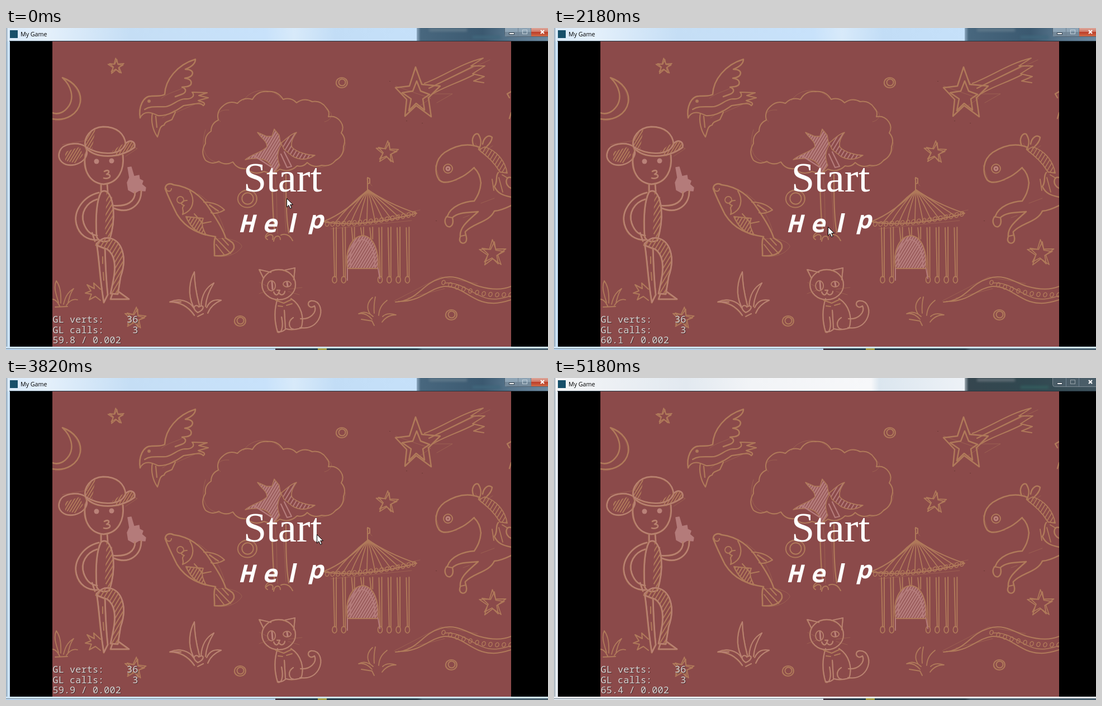
An HTML page with a canvas for the animation above (5280 ms loop, 970 px wide and 577 px high).

```html
<!DOCTYPE html>
<html lang="en">
<head>
<meta charset="utf-8">
<title>My Game</title>
<style>
html, body { margin: 0; width: 100%; height: 100%; overflow: hidden; background: #000; }
canvas { display: block; }
</style>
</head>
<body>
<canvas id="stage" width="970" height="577"></canvas>
<script>
const W = 970, H = 577, LOOP = 5280;
const ctx = document.getElementById('stage').getContext('2d');
const ORANGE = '#b07a5a', PINK = '#ba8279', HATCH = '#b47b7a';

// [time, x, y] of the pointer; each position holds until the next
const POINTER = [
  [0, 502, 305], [160, 502, 326], [300, 500, 340], [430, 497, 346], [570, 495, 349],
  [700, 492, 349], [840, 492, 340], [970, 490, 326], [1110, 489, 300], [1240, 490, 275],
  [1360, 490, 272], [1790, 492, 300], [1900, 494, 326], [2050, 492, 345], [2180, 490, 356],
  [3430, 505, 320], [3550, 530, 288], [3700, 548, 265], [3820, 556, 280], [4120, 560, 283],
  [4250, 567, 286], [4390, 620, 330], [4520, 760, 430], [4640, 925, 545], [4790, 933, 552],
  [4910, 934, 566], [5060, -50, -50]
];
const STATS = [
  [0, '59.8 / 0.002'], [160, '59.6 / 0.002'], [570, '59.7 / 0.001'], [840, '60.1 / 0.001'],
  [970, '59.9 / 0.001'], [1240, '60.1 / 0.002'], [1790, '59.9 / 0.001'], [2050, '60.1 / 0.002'],
  [2330, '59.8 / 0.002'], [2610, '60.2 / 0.002'], [2890, '61.1 / 0.001'], [3160, '60.1 / 0.002'],
  [3310, '59.5 / 0.002'], [3700, '59.9 / 0.002'], [4120, '60.1 / 0.002'], [4390, '59.7 / 0.002'],
  [4790, '60.0 / 0.002'], [5060, '59.8 / 0.002'], [5180, '65.4 / 0.002']
];

const held = (keys, t) => keys.filter(k => k[0] <= t).pop();
const within = (t, a, b) => t >= a && t < b;

function box(c, x, y, w, h, fill) {
  c.fillStyle = fill;
  c.fillRect(x, y, w, h);
}

function blend(c, x0, y0, x1, y1, ...stops) {
  const g = c.createLinearGradient(x0, y0, x1, y1);
  stops.forEach(([p, col]) => g.addColorStop(p, col));
  return g;
}

function paintArt() {
  const cv = document.createElement('canvas');
  cv.width = W;
  cv.height = H;
  const c = cv.getContext('2d');
  c.lineCap = c.lineJoin = 'round';
  box(c, 83, 24, 821, 547, '#8b4a4a');
  c.beginPath();
  c.rect(83, 24, 821, 547);
  c.clip();

  const line = (d, col = ORANGE, w = 2.5) => {
    c.strokeStyle = col;
    c.lineWidth = w;
    c.stroke(d instanceof Path2D ? d : new Path2D(d));
  };
  // crayon line: orange edge with a pinker core
  const crayon = (d, w = 3) => {
    line(d, ORANGE, w);
    c.save();
    c.translate(.4, -.3);
    line(d, PINK, w * .55);
    c.restore();
  };
  const faint = d => {
    c.globalAlpha = .45;
    line(d, ORANGE, 1);
    c.globalAlpha = 1;
  };
  const hatch = (d, x, y, w, h, gap = 4, col = HATCH, lw = 2) => {
    c.save();
    c.clip(new Path2D(d));
    c.beginPath();
    for (let i = x - h; i < x + w + h; i += gap) {
      c.moveTo(i, y + h);
      c.lineTo(i + h * .6, y);
    }
    c.strokeStyle = col;
    c.lineWidth = lw;
    c.stroke();
    c.restore();
  };
  const oval = (x, y, rx, ry = rx, rot = 0) => {
    const p = new Path2D();
    p.ellipse(x, y, rx, ry, rot, 0, 7);
    return p;
  };
  const bumps = (pts, k) => {
    const p = new Path2D();
    p.moveTo(...pts[0]);
    pts.slice(1).forEach(([x, y], i) => {
      const [a, b] = pts[i];
      p.quadraticCurveTo((a + x) / 2 + (y - b) * k, (b + y) / 2 - (x - a) * k, x, y);
    });
    return p;
  };
  const star = (x, y, r, rot) => {
    for (const [s, turn] of [[1, 0], [.85, .16]]) {
      const p = new Path2D();
      for (let i = 0; i < 10; i++) {
        const a = rot + turn + i * Math.PI / 5, q = s * r * (i % 2 ? .38 : 1);
        p.lineTo(x + q * Math.sin(a), y - q * Math.cos(a));
      }
      p.closePath();
      line(p, ORANGE, 1.7);
    }
  };
  const ring = (x, y, r) => {
    line(oval(x, y, r, r * .92), ORANGE, 1.8);
    line(oval(x + .5, y - .5, r * .6), ORANGE, 2);
    faint(oval(x - 1, y + 1, r, r * .85));
  };

  // sky
  line('M101 89C122 96 136 114 133 133C129 154 108 167 83 163M101 89C117 104 122 124 113 139C105 151 94 156 83 152');
  faint('M106 92C130 104 139 130 126 150C116 162 100 166 88 166');
  star(197, 69, 15, -.05);
  star(682, 223, 21, .06);
  star(871, 404, 25, -.02);
  star(231, 520, 20, .12);
  ring(601, 98, 10);
  ring(419, 525, 10);
  ring(797, 514, 10);
  ring(432, 306, 17);
  line('M904 114L897 118L901 125M904 152L901 162');
  line('M733 70L744 101L777 104L756 125L761 159L734 139L714 158L717 128L697 107L722 104Z');
  line('M735 95L742 113L758 119L746 127L749 147L734 135L721 148L725 127L709 116L728 113Z');
  line('M749 99C780 88 815 63 854 54L832 68L857 68L835 82L856 87L837 95L855 98M757 108L836 69M764 118C785 105 810 98 837 84', ORANGE, 2);
  faint('M733 74L747 103M766 118L799 118L771 134M763 105L866 57M697 104L760 126L740 140');

  // bird
  line('M240 161C237 142 245 122 260 122C271 121 277 123 284 119C285 93 306 66 339 56C339 65 331 70 321 74C331 74 336 78 333 84C330 89 325 89 320 90C329 91 333 95 331 101C328 106 321 105 315 106C324 109 323 116 314 119L303 123');
  line('M240 161C247 147 260 151 272 157C290 158 305 148 318 139C337 137 347 132 353 139C360 134 349 132 344 130L362 125L345 121L360 116L333 115C340 122 331 128 320 127C308 127 299 139 286 141C270 142 259 139 248 146', ORANGE, 2.2);
  line('M262 153C259 167 263 184 271 195C275 184 275 175 283 174C285 167 290 168 297 164L303 151M268 158L270 178', ORANGE, 2.2);
  line(oval(256, 131, 1.6));
  faint('M315 108C305 114 292 115 278 126M305 151L351 131M280 161L302 147');

  // tree
  const crown = bumps([[381, 239], [357, 237], [357, 207], [367, 185], [380, 165], [388, 140], [414, 135],
    [441, 128], [468, 114], [496, 128], [520, 134], [548, 132], [573, 143], [577, 159], [599, 168],
    [600, 188], [604, 212], [590, 237], [565, 246], [539, 241], [521, 247], [490, 253], [462, 257],
    [430, 252], [406, 240], [381, 239]], .32);
  line(crown, ORANGE, 2);
  faint('M357 182C343 230 367 246 402 242M384 168C374 158 379 145 399 147M425 130C440 105 480 108 492 126M573 146C589 152 582 166 570 168M607 205C610 228 586 247 560 250');
  const leftBough = 'M450 187C458 199 468 204 467 213C456 224 443 224 428 236C448 232 464 232 474 246L478 262L490 246C484 232 486 222 492 210L489 192L480 181L476 194L466 194Z';
  const rightBough = 'M492 206C500 201 507 191 520 187C512 198 509 206 512 214C522 223 540 228 553 228C538 238 524 236 513 230L498 218Z';
  hatch(leftBough, 425, 180, 70, 84, 5, HATCH, 3.2);
  hatch(rightBough, 490, 186, 64, 50, 7, HATCH, 2);
  line(leftBough, ORANGE, 1.4);
  line(rightBough, ORANGE, 1.6);
  line('M498 222L511 248L503 250L492 226', HATCH, 2.2);
  line('M444 229L478 251', HATCH, 2.5);
  line('M474 262C478 290 476 330 481 365M501 262C501 300 501 338 506 367', ORANGE, 2.2);
  faint('M482 268C486 310 484 340 486 368M496 268L501 365');
  line('M466 374C472 368 480 369 477 379M479 382C480 371 491 370 491 379M492 371C503 367 509 373 513 381M471 366C464 370 462 376 468 379', ORANGE, 2);

  // boy
  const brim = 'M143 213C128 203 101 207 96 221C90 237 104 249 123 245C135 242 144 234 145 224Z';
  const cap = 'M142 213C138 197 151 178 174 177C199 177 212 190 214 208C206 229 168 229 142 213Z';
  hatch('M106 222L132 213L138 228L124 242L106 238Z', 105, 210, 36, 33, 5, ORANGE, 2);
  hatch('M142 213C140 198 148 186 160 181L154 218Z', 142, 180, 20, 40, 5, ORANGE, 2);
  hatch('M190 221C201 212 212 205 226 202L230 214L201 230Z', 188, 202, 42, 28, 5, ORANGE, 2);
  crayon(brim, 2.6);
  crayon(cap, 2.8);
  crayon('M143 215C161 235 203 234 230 214C232 203 222 199 214 207M144 222C135 248 146 277 174 280C202 278 212 253 209 228');
  faint('M101 209L117 206L148 201M222 211L235 216L214 230M140 225L145 260');
  c.fillStyle = PINK;
  c.fill(oval(162, 239, 4.5));
  c.fill(oval(189, 238, 4.5));
  crayon('M176 257C184 252 187 259 180 262C190 262 187 272 175 269', 2.8);
  const hand = 'M218 250L224 249L229 266L238 264L239 271L245 274L243 280L250 286L249 292L238 291L230 296L219 290L217 277L221 268Z';
  c.fillStyle = HATCH;
  c.fill(new Path2D(hand));
  line(hand, HATCH, 1.5);
  crayon('M231 294C231 310 218 321 190 318M242 292C242 316 222 335 193 323M170 281L170 293M181 281L182 293');
  const torso = 'M170 294C181 286 190 302 192 326C194 351 188 371 185 381C174 385 163 381 162 373C160 339 162 310 170 294Z';
  hatch('M180 292L190 303L192 351L185 379L177 367Z', 165, 290, 30, 92, 7, ORANGE, 2);
  crayon(torso);
  crayon('M166 295C137 302 120 329 126 352C131 371 145 380 163 380M163 307C143 313 133 332 139 350C145 367 154 371 163 372M154 367L159 382');
  const leg = 'M161 389C173 369 197 374 206 394C213 410 211 429 205 446L200 477L187 476C192 452 197 433 193 416C190 402 181 395 176 395Z';
  hatch(leg, 161, 378, 50, 98, 7, ORANGE, 2);
  crayon(leg);
  crayon('M162 386C167 416 168 452 175 492M177 395C178 427 179 451 182 478L175 492M190 477L187 486L220 486L202 473');
  line('M169 468L157 457L158 467L145 460L152 471L142 475L153 477L149 487L160 481L169 488', ORANGE, 2);
  line('M173 410V422M174 438L175 452', ORANGE, 2);

  // fish
  const fish = 'M285 288C285 280 293 277 300 281C331 285 352 304 365 325C380 347 390 365 393 376C401 383 409 383 408 394C403 408 386 409 373 408C374 396 370 383 375 374C348 370 323 361 306 334C297 316 290 302 285 288Z';
  line(fish, ORANGE, 2.6);
  line('M329 292C338 307 337 326 316 334C320 326 312 324 319 318C309 315 316 309 324 309M354 312C365 312 380 315 391 326C384 330 375 334 367 331M364 317L380 328', ORANGE, 2.2);
  const fin = 'M322 338L353 341C348 352 354 363 358 371C344 368 331 359 322 338Z';
  hatch(fin, 322, 337, 35, 34, 6, ORANGE, 2);
  line(fin, ORANGE, 2);
  line(oval(312, 308, 6), ORANGE, 1.8);
  line('M287 288A4 4 0 1 0 296 288M374 375L402 404M376 388L391 407M387 377L398 389M337 333L352 350L367 347', ORANGE, 2);
  faint('M375 379C396 373 423 384 422 392C413 407 391 412 374 408M344 297C369 313 383 336 391 363');

  // plants
  line('M96 498C92 490 88 486 83 486M98 493C99 475 97 462 90 453M90 453C84 466 91 480 94 492M103 495C107 478 113 472 121 467C114 476 113 486 111 492M108 497C114 488 121 485 128 487M88 500L110 499', ORANGE, 1.8);
  crayon('M337 515C326 499 312 491 293 491C311 483 329 490 336 502M335 499C324 476 329 452 337 437C337 460 341 478 346 497M349 498C350 478 359 464 372 457C362 473 358 486 357 499M359 501C365 488 374 486 385 488C373 493 365 501 361 511M343 510C329 501 341 493 345 500C354 494 357 504 343 510M343 517L353 512M294 491L313 491', 2.3);
  line('M655 522C648 514 640 510 631 512C642 506 652 512 657 517M652 513C644 502 647 491 656 483M659 511C658 500 659 491 661 482M667 515C668 502 673 495 682 488M674 517C679 512 688 511 698 514C685 514 678 520 673 527M636 522L655 525L659 533', ORANGE, 1.8);

  // cat
  crayon(oval(488, 460, 30, 27), 2.3);
  crayon('M461 449L453 433L474 438M499 434L517 430L515 451M485 470L490 470L488 474C485 482 480 477 479 473M488 474C492 481 498 478 499 472M486 485C479 506 480 525 486 545C493 548 497 536 493 518M510 485C529 497 534 520 528 538C517 541 507 541 500 539L498 506M501 539C495 545 490 545 486 544M514 519C503 526 506 539 515 540M527 521C545 523 557 509 552 498C542 506 536 491 546 489C562 488 568 507 559 523C551 536 538 539 526 537', 2.3);
  crayon(oval(475, 462, 7, 9), 1.8);
  crayon(oval(503, 459, 7, 5), 1.8);
  line('M476 455L477 468M503 456L504 462', PINK, 3);
  line('M483 488L497 493L512 486M487 498L495 499M502 497L512 494', ORANGE, 2);
  faint('M454 456L470 464M453 476L470 470M505 468L530 465M505 472L525 478');

  // tent
  line('M648 290C625 314 600 334 568 347C617 357 688 345 735 332C708 323 677 310 648 290M647 290V268L651 270V278L647 279', ORANGE, 2);
  for (let i = 0; i < 10; i++) {
    const x = 588 + i * 14.5, y = 350 - i * i * .16;
    line(`M648 290Q${(648 + x) / 2 + (i - 4.5)} 317 ${x} ${y}`, ORANGE, 1.7);
  }
  for (let i = 0; i < 17; i++) line(oval(575 + i * 9.7, 351 - i * i * .07, 3.2, 4.5, .4), ORANGE, 1.4);
  for (let i = 0; i < 9; i++) {
    const x = 586 + i * 16.3, inDoor = x > 612 && x < 664;
    const end = inDoor ? 370 + Math.abs(x - 638) * .6 : 446;
    line(`M${x} 358L${x + 2} ${end}M${x + 5} 357L${x + 5} ${end}`, ORANGE, 1.9);
    if (!inDoor) line(oval(x + 2, 451, 4, 6), ORANGE, 1.7);
  }
  const door = 'M611 431C606 400 618 374 638 372C658 373 668 399 666 431Z';
  hatch(door, 610, 371, 58, 61, 5, HATCH, 3.2);
  line(door, ORANGE, 2);
  line('M611 431V452M666 431L669 449M617 427C613 397 624 381 638 379C651 381 661 397 660 428', HATCH, 2);
  faint('M568 347L640 349L741 326M581 360L726 345M645 270L655 283');

  // horse
  line('M848 214C824 204 802 212 785 223C766 237 767 260 775 272C784 281 799 275 811 269C825 263 832 255 838 250M837 211C831 198 839 187 845 190C851 199 851 209 846 217M853 208C855 196 864 190 870 196C869 206 861 211 857 216');
  line(oval(791, 252, 8), ORANGE, 2);
  line(oval(791, 252, 3), PINK, 3);
  const mane = 'M857 213C878 220 893 237 897 260L884 258C872 238 858 228 846 218Z';
  hatch(mane, 850, 213, 48, 47, 7, ORANGE, 1.6);
  line(mane, ORANGE, 1.8);
  line('M838 251C846 258 849 268 850 278M850 277C849 292 844 301 838 310C820 311 796 319 790 337C782 343 786 358 795 356C802 352 800 344 799 340C809 329 831 331 845 329C830 343 811 356 813 374C809 384 818 389 823 383C827 376 821 369 822 365C837 349 865 348 874 328C886 327 896 322 904 318M881 259C875 266 881 275 874 284C880 297 890 300 904 303M904 268C894 264 891 282 904 287');
  line('M788 338L799 340M814 373L823 371M870 271L873 291M882 268L889 294M888 263L898 269', ORANGE, 1.8);
  faint('M840 207L851 224L871 211M768 246L778 276L807 273M850 314L874 305M818 340L829 336');

  // path
  line('M697 491C738 488 743 459 777 449C804 439 827 457 847 463C872 470 890 469 904 463M702 490C742 491 756 467 784 463C817 461 833 492 869 493C882 494 895 490 904 487', ORANGE, 2);
  line('M785 457C817 454 836 480 864 485C880 488 894 482 904 480', ORANGE, 1.6);
  for (let i = 0; i < 11; i++) line(oval(783 + i * 12, 456 + 22 * Math.sin(Math.min(i, 8) * .19), 3, 4, .4), ORANGE, 1.4);
  faint('M695 489L778 446L844 458M719 484L785 467');
  [[686, 95], [716, 166], [769, 345], [744, 170]].forEach(([x, y]) => box(c, x, y, 2, 1, '#6c3936'));
  return cv;
}

function paintChrome(c, active) {
  const pale = active ? '#c9e2fb' : '#e9edf3';
  box(c, 0, 0, W, H, pale);
  box(c, 0, 0, 737, 24, active
    ? blend(c, 0, 0, 737, 0, [0, '#d9eafb'], [.1, '#e4f0fb'], [.3, '#c5def5'], [.63, '#c8e2fb'], [.7, '#d8eafa'], [.8, '#c2ddf6'], [1, '#c6e1fa'])
    : blend(c, 0, 0, 737, 0, [0, '#f4f5f7'], [.32, '#e2e9f0'], [.48, '#f2f4f7'], [.77, '#f7f8fa'], [.79, '#dbe6ef'], [1, '#eef2f7']));
  box(c, 735, 0, 235, 24, active
    ? blend(c, 735, 0, 970, 0, [0, '#8ea9c1'], [.03, '#48677e'], [.5, '#3b5970'], [.72, '#58768d'], [1, '#6d899f'])
    : blend(c, 735, 0, 970, 0, [0, '#a3adb5'], [.03, '#35464f'], [.5, '#304850'], [1, '#3d515b']));
  c.save();
  c.filter = 'blur(2px)';
  box(c, 757, 1, 68, 5, active ? '#60798b' : '#637078');
  box(c, 835, 14, 50, 5, active ? '#40677c' : '#345d5e');
  c.restore();
  box(c, 6, 23, W, 1, '#24343f');
  box(c, 1, 0, 1, H, '#6d7d8a');
  box(c, 2, 24, 4, H, active ? '#cae2f7' : '#e7edf4');

  // window buttons
  c.beginPath();
  c.roundRect(892.5, -4, 84, 19.5, 4);
  c.fillStyle = active ? '#8ea4b5' : '#4a5d68';
  c.fill();
  c.strokeStyle = active ? '#4d6171' : '#7d8a93';
  c.lineWidth = 1;
  c.stroke();
  if (active) {
    box(c, 893, 7, 46, 8, '#74899a');
    box(c, 940, 0, 30, 15, blend(c, 0, 0, 0, 15, [0, '#dda69a'], [.45, '#cf7664'], [.5, '#bd3c27'], [1, '#cf6b48']));
  }
  box(c, 916, 0, 1, 15, '#6e8292');
  box(c, 939, 0, 1, 15, '#6e8292');
  box(c, 900, 8, 10, 4, '#34434f');
  box(c, 901, 9, 8, 2, '#fff');
  c.strokeStyle = active ? '#c3d0da' : '#97a2a9';
  c.strokeRect(924.5, 3.5, 8, 7);
  c.lineWidth = 2.2;
  c.strokeStyle = '#fff';
  c.stroke(new Path2D('M957 4L963 10M963 4L957 10'));

  box(c, 7, 4, 14, 14, '#17506a');
  c.font = '10.7px "Open Sans", sans-serif';
  c.textAlign = 'left';
  c.fillStyle = '#000';
  c.fillText('My Game', 26, 15);

  box(c, 7, 24, 963, 547, '#000');

  // lower border with the desktop showing through
  box(c, 0, 571, W, 3, active ? '#cfe5f8' : '#e9edf2');
  box(c, 0, 574, W, 1, '#74848f');
  box(c, 0, 575, 482, 2, active ? '#bcd8f1' : '#e2e9ef');
  box(c, 482, 574, 488, 3, blend(c, 482, 0, 970, 0, [0, '#433945'], [.12, '#233e4b'], [.52, '#2b414d'], [.54, '#4a6170'], [1, '#4a6170']));
  box(c, 558, 574, 16, 3, '#a3a14d');
}

function scaled(c, x, y, k, paint) {
  c.save();
  c.translate(x, y);
  c.scale(k, k);
  paint();
  c.restore();
}

function paintMenu(c, t) {
  const startOn = within(t, 1240, 1790) || within(t, 3970, 4390);
  const helpOn = within(t, 2330, 3310);
  c.fillStyle = '#fff';
  c.textAlign = 'center';
  scaled(c, 495, 267, startOn ? 1.2 : 1, () => {
    c.font = '74.5px "Liberation Serif", serif';
    c.fillText('Start', 0, 25.5);
  });
  scaled(c, 493, 351, helpOn ? 1.2 : 1, () => {
    [...'Help'].forEach((ch, i) => {
      const face = ch === 'l' ? '"Noto Sans"' : '"Noto Sans Mono"';
      const lift = ch === 'p' ? 7 : 0;
      c.font = `italic bold 44px ${face}, sans-serif`;
      c.fillText(ch, -63 + i * 41.5, 15 - lift);
    });
  });
}

function paintStats(c, t) {
  const rows = ['GL verts:    36', 'GL calls:     3', held(STATS, t)[1]];
  c.font = '17px "Noto Sans Mono", monospace';
  c.textAlign = 'left';
  rows.forEach((row, i) => {
    const y = 527.6 + i * 18.9;
    c.fillStyle = '#4b3030';
    c.fillText(row, 84.5, y + 1);
    c.fillStyle = '#d9d3d2';
    c.fillText(row, 83.5, y);
  });
}

const arrow = new Path2D('M.5 .5V16L4 12.6L6.6 18.5L9.2 17.4L6.7 11.6H11.5Z');
function paintPointer(c, t) {
  const [, x, y] = held(POINTER, t);
  c.save();
  c.translate(x, y);
  c.fillStyle = '#fff';
  c.fill(arrow);
  c.strokeStyle = '#000';
  c.lineWidth = 1;
  c.stroke(arrow);
  c.restore();
}

const art = paintArt();
function frame() {
  const t = performance.now() % LOOP;
  paintChrome(ctx, t < 5180);
  ctx.drawImage(art, 0, 0);
  paintMenu(ctx, t);
  paintStats(ctx, t);
  paintPointer(ctx, t);
  requestAnimationFrame(frame);
}
frame();
</script>
</body>
</html>
```
